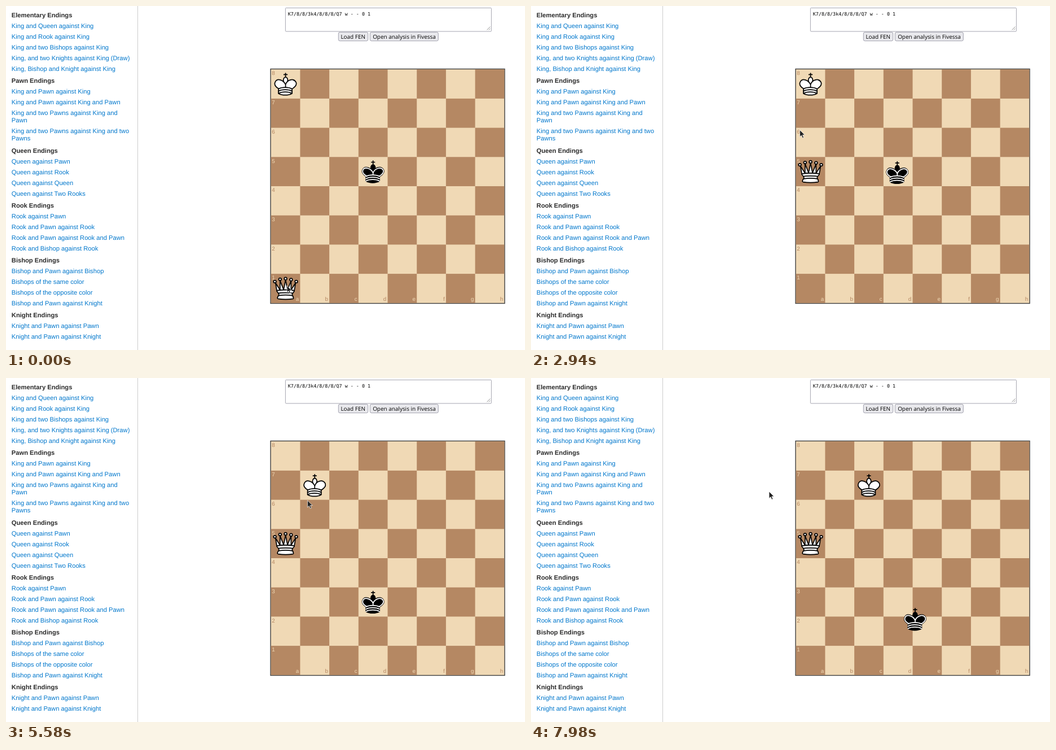
An HTML page for the animation above (8000 ms loop, 920 px wide and 609 px high).

```html
<!DOCTYPE html>
<html lang="en">
<head>
<meta charset="utf-8">
<title>Chess endings</title>
<style>
html, body { margin: 0; width: 100%; height: 100%; overflow: hidden; background: #fff; }
svg { display: block; }
text { text-rendering: geometricPrecision; white-space: pre; }
.menu { font: 11.2px "Liberation Sans", Arial, sans-serif; fill: #0077cc; }
.menu .head { font-weight: bold; fill: #2b2b2b; }
.coord { font: 9.8px "Liberation Sans", Arial, sans-serif; }
.btn { font: 500 9.95px "Open Sans", "Noto Sans", sans-serif; text-anchor: middle; }
.fen { font: 8.4px "DejaVu Sans Mono", monospace; }
.box { stroke: #8f8f9d; stroke-width: .8; }
.piece { stroke: #000; stroke-width: 1.5; stroke-linecap: round; stroke-linejoin: round; }
.mark { fill: none; stroke: #ff0; stroke-width: 2.6; opacity: .93; }
</style>
</head>
<body>
<svg width="920" height="609" viewBox="0 0 920 609">
  <defs>
    <filter id="soft" x="-10%" y="-10%" width="120%" height="120%"><feGaussianBlur stdDeviation=".6"/></filter>
    <path id="cross" d="M22.5 11.63V6M20 8h5"/>
    <path id="bulb" d="M22.5 25s4.5-7.5 3-10.5c0 0-1-2.5-3-2.5s-3 2.5-3 2.5c-1.5 3 3 10.5 3 10.5"/>
    <path id="robe" d="M11.5 37c5.5 3.5 15.5 3.5 21 0v-7s9-4.5 6-10.5c-4-6.5-13.5-3.5-16 4V27v-3.5c-3.5-7.5-13-10.5-16-4-3 6 5 10 5 10V37z"/>
    <path id="bands" d="M11.5 30c5.5-3 15.5-3 21 0m-21 3.5c5.5-3 15.5-3 21 0m-21 3.5c5.5-3 15.5-3 21 0" fill="none"/>
  </defs>
  <path d="M233.5 0V609" stroke="#ccc"/>
  <g id="menu" class="menu"></g>

  <rect class="box" x="495.4" y="3.4" width="365" height="41.6" rx="1.2" fill="#fff"/>
  <text class="fen" x="499.8" y="17">K7/8/8/3k4/8/8/8/Q7 w - - 0 1</text>
  <path d="M852.5 42.5l6-6M855.8 42.5l2.7-2.7" stroke="#888" stroke-width=".9"/>
  <rect class="box" x="589.3" y="46.4" width="52.4" height="15.4" rx="2.6" fill="#e9e9ed"/>
  <text class="btn" x="615.2" y="58">Load FEN</text>
  <rect class="box" x="645.3" y="46.4" width="121" height="15.4" rx="2.6" fill="#e9e9ed"/>
  <text class="btn" x="706" y="58">Open analysis in Fivessa</text>

  <g id="board"></g>
  <rect id="markFrom" class="mark" filter="url(#soft)"/>
  <rect id="markOver" class="mark" filter="url(#soft)"/>

  <g id="blackKing" class="piece">
    <use href="#cross" fill="none"/><use href="#bulb"/><use href="#robe"/>
    <g stroke="#fff" fill="none">
      <path d="M32 29.5s8.5-4 6.03-9.65C34.15 14 25 18 22.5 24.5v2.1-2.1C20 18 9.906 14 6.997 19.85c-2.497 5.65 4.853 9 4.853 9"/>
      <use href="#bands"/>
    </g>
  </g>
  <g id="queen" class="piece" fill="#fff">
    <circle cx="6" cy="12" r="2"/><circle cx="14" cy="8.5" r="2"/><circle cx="22.5" cy="7.5" r="2"/>
    <circle cx="31" cy="9" r="2"/><circle cx="39" cy="12" r="2"/>
    <path d="M9 26c8.5-1.5 21-1.5 27 0l2-12-7 11V11l-5.5 13.5-3-15-3 15-5.5-14V25L7 14z"/>
    <path d="M9 26c0 2 1.5 2 2.5 4 1 1.5 1 1 .5 3.5-1.5 1-1.5 2.5-1.5 2.5-1.5 1.5.5 2.5.5 2.5 6.5 1 16.5 1 23 0 0 0 1.5-1 0-2.5 0 0 .5-1.5-1-2.5-.5-2.5-.5-2 .5-3.5 1-2 2.5-2 2.5-4-8.5-1.5-18.5-1.5-27 0z"/>
    <path d="M11.5 30c3.5-1 18.5-1 22 0M12 33.5c6-1 15-1 21 0" fill="none"/>
  </g>
  <g id="whiteKing" class="piece" fill="#fff">
    <use href="#cross" fill="none"/><use href="#bulb"/><use href="#robe"/><use href="#bands"/>
  </g>
  <path id="cursor" d="M0 0V12.2L2.8 9.6L4.9 14.2L6.9 13.3L4.9 8.8H8.8Z" fill="#222" stroke="#fff" stroke-width=".7"/>
</svg>
<script>
const NS = 'http://www.w3.org/2000/svg';
const $ = id => document.getElementById(id);
const LOOP = 8000, X0 = 469.7, Y0 = 112.2, SQ = 51.7;
const SNAP = 60, THINK = 240, SLIDE = 200;
const LIGHT = '#f0d9b5', DARK = '#b58863', FILES = 'abcdefgh';

function setAll(el, attrs) {
  for (const k in attrs) el.setAttribute(k, attrs[k]);
}
function add(parent, tag, attrs, text) {
  const el = document.createElementNS(NS, tag);
  setAll(el, attrs);
  if (text) el.textContent = text;
  parent.appendChild(el);
}

// Sidebar: a group's first line is its heading, "|" breaks a line.
const groups = `Elementary Endings
King and Queen against King
King and Rook against King
King and two Bishops against King
King, and two Knights against King (Draw)
King, Bishop and Knight against King

Pawn Endings
King and Pawn against King
King and Pawn against King and Pawn
King and two Pawns against King and|Pawn
King and two Pawns against King and two|Pawns

Queen Endings
Queen against Pawn
Queen against Rook
Queen against Queen
Queen against Two Rooks

Rook Endings
Rook against Pawn
Rook and Pawn against Rook
Rook and Pawn against Rook and Pawn
Rook and Bishop against Rook

Bishop Endings
Bishop and Pawn against Bishop
Bishops of the same color
Bishops of the opposite color
Bishop and Pawn against Knight

Knight Endings
Knight and Pawn against Pawn
Knight and Pawn against Knight`.split('\n\n');
let y = 20.4;
for (const group of groups) {
  group.split('\n').forEach((item, i) => {
    item.split('|').forEach((line, j) => {
      if (j) y += 13.3;
      add($('menu'), 'text', { x: 9.8, y, class: i ? '' : 'head' }, line);
    });
    y += 18.87;
  });
  y += 2.73;
}

const board = $('board');
add(board, 'rect', { x: X0 - .7, y: Y0 - .7, width: 8 * SQ + 1.4, height: 8 * SQ + 1.4,
  fill: LIGHT, stroke: '#404040', 'stroke-width': 1.4 });
for (let r = 0; r < 8; r++)
  for (let c = 0; c < 8; c++)
    if ((r + c) % 2) add(board, 'rect', { x: X0 + c * SQ, y: Y0 + r * SQ, width: SQ, height: SQ, fill: DARK });
for (let i = 0; i < 8; i++) {
  add(board, 'text', { class: 'coord', x: X0 + 1.5, y: Y0 + i * SQ + 10.2, fill: i % 2 ? LIGHT : DARK }, String(8 - i));
  add(board, 'text', { class: 'coord', x: X0 + (i + 1) * SQ - 2.2, y: Y0 + 8 * SQ - 4.2,
    'text-anchor': 'end', fill: i % 2 ? DARK : LIGHT }, FILES[i]);
}

const swing = p => .5 - Math.cos(Math.PI * Math.max(0, Math.min(1, p))) / 2;
const mix = (a, b, p) => a.map((v, i) => v + (b[i] - v) * p);
const cell = name => [FILES.indexOf(name[0]), 8 - name[1]];
const centre = name => cell(name).map((v, i) => (i ? Y0 : X0) + (v + .5) * SQ);

// Pointer strokes: start, end, and where each one stops.
const strokes = [
  [700, 1380, 476, 329], [2440, 2500, 488, 292], [2680, 2940, 476.5, 219.5],
  [3060, 3640, 490.5, 180], [3760, 4080, 497, 149], [4320, 4760, 538, 192.5],
  [5020, 5740, 534, 220], [5860, 6280, 542.5, 194], [6440, 7120, 601, 198], [7630, 7980, 422, 201]
];
const pointer = t => strokes.reduce(
  (p, [start, end, ...stop]) => mix(p, stop, swing((t - start) / (end - start))), [498, 495]);

// Each drag is answered by a black king move.
const moves = [
  { piece: 'queen', from: 'a1', to: 'a5', grab: 700, drop: 2680, reply: 'c4' },
  { piece: 'whiteKing', from: 'a8', to: 'b7', grab: 4320, drop: 5020, reply: 'd3' },
  { piece: 'whiteKing', from: 'b7', to: 'c7', grab: 6440, drop: 7630, reply: 'e2' }
];

function place(id, [x, y]) {
  $(id).setAttribute('transform', `translate(${x - SQ / 2} ${y - SQ / 2}) scale(${SQ / 45})`);
}
function mark(id, square) {
  const el = $(id);
  el.style.display = square ? '' : 'none';
  if (square) setAll(el, { x: X0 + square[0] * SQ + 1.3, y: Y0 + square[1] * SQ + 1.3,
    width: SQ - 2.6, height: SQ - 2.6 });
}

function draw(t) {
  const pos = { queen: centre('a1'), whiteKing: centre('a8'), blackKing: centre('d5') };
  const tip = pointer(t);
  let source = null, over = null;
  for (const m of moves) {
    if (t < m.grab) break;
    if (t < m.drop) {
      pos[m.piece] = tip;
      source = cell(m.from);
      over = [Math.floor((tip[0] - X0) / SQ), Math.floor((tip[1] - Y0) / SQ)];
    } else {
      pos[m.piece] = mix(pointer(m.drop), centre(m.to), swing((t - m.drop) / SNAP));
      pos.blackKing = mix(pos.blackKing, centre(m.reply), swing((t - m.drop - THINK) / SLIDE));
    }
  }
  for (const id in pos) place(id, pos[id]);
  mark('markFrom', source);
  mark('markOver', String(over) === String(source) ? null : over);
  $('cursor').setAttribute('transform', `translate(${tip.join(' ')})`);
}

const begin = performance.now();
function tick(now) {
  draw(Math.max(0, now - begin) % LOOP);
  requestAnimationFrame(tick);
}
draw(0);
requestAnimationFrame(tick);
</script>
</body>
</html>
```
